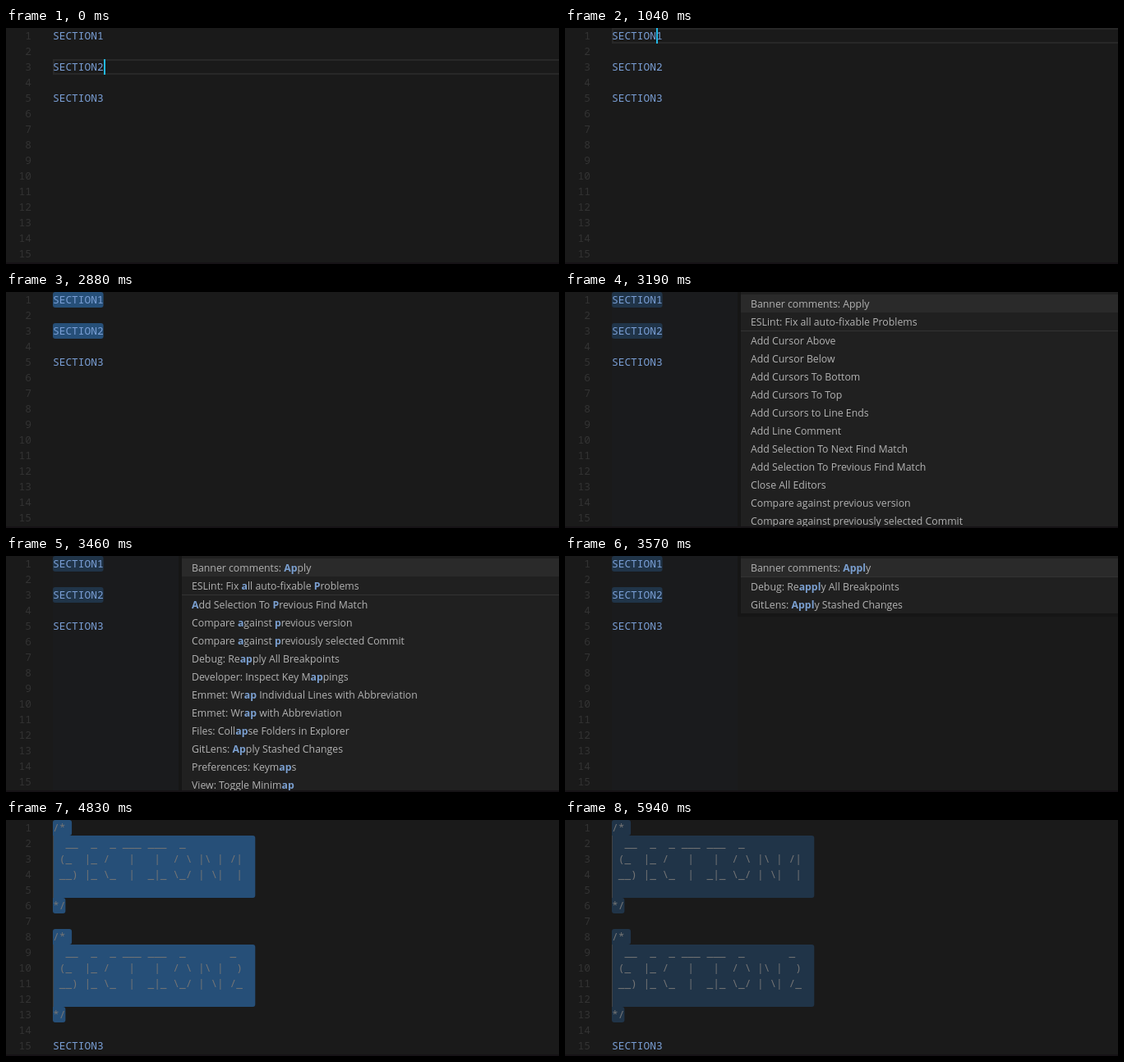
An HTML page for the animation above (5.97 s loop, 673 by 288 pixels).

```html
<!DOCTYPE html>
<html lang="en">
<head>
<meta charset="utf-8">
<title>Banner comments</title>
<style>
  html, body { margin: 0; width: 100%; height: 100%; overflow: hidden; background: #1a1a1a; }
  svg { display: block; }
  text { white-space: pre; }
  .code { font: 12.83px "Noto Sans Mono", monospace; fill: #7a9fd6; }
  .note { fill: #757575; }
  .num { fill: #333; text-anchor: end; }
  .menu { font: 12.3px "Open Sans", sans-serif; fill: #b2b2b2; }
  .menu tspan { font-weight: 700; fill: #7a9fd0; }
</style>
</head>
<body>
<svg id="stage" width="673" height="288" viewBox="0 0 673 288"></svg>
<script>
const LOOP = 5970, LINE = 19, LEFT = 57, CHAR = 7.697;
const stage = document.getElementById("stage");

const plain = ["SECTION1", "", "SECTION2", "", "SECTION3"];
const banner = (a, b, c) => [
  "/*",
  "  __  _  _ ___ ___  _       " + a,
  " (_  |_ /   |   |  / \\ |\\ | " + b,
  " __) |_ \\_  |  _|_ \\_/ | \\| " + c,
  "",
  "*/",
  ""
];
const banners = [...banner("", "/|", " |"), ...banner("_", " )", "/_"), "SECTION3"];

// Brackets mark the matched letters; "-" is the separator.
const listA = [
  "Banner comments: [A]pply", "ESLint: Fix [a]ll auto-fixable Problems", "-",
  "[A]dd Cursor Above", "[A]dd Cursor Below", "[A]dd Cursors To Bottom",
  "[A]dd Cursors To Top", "[A]dd Cursors to Line Ends", "[A]dd Line Comment",
  "[A]dd Selection To Next Find Match", "[A]dd Selection To Previous Find Match",
  "Close [A]ll Editors", "Compare [a]gainst previous version",
  "Compare [a]gainst previously selected Commit"
];
const listAll = listA.map(s => s.replace(/[\[\]]/g, ""));
const listAp = [
  "Banner comments: [Ap]ply", "ESLint: Fix [a]ll auto-fixable [P]roblems", "-",
  "[A]dd Selection To [P]revious Find Match", "Compare [a]gainst [p]revious version",
  "Compare [a]gainst [p]reviously selected Commit", "Debug: Re[ap]ply All Breakpoints",
  "Developer: Inspect Key M[ap]pings", "Emmet: Wr[ap] Individual Lines with Abbreviation",
  "Emmet: Wr[ap] with Abbreviation", "Files: Coll[ap]se Folders in Explorer",
  "GitLens: [Ap]ply Stashed Changes", "Preferences: Keym[ap]s", "View: Toggle Minim[ap]"
];
const listApp = [
  "Banner comments: [App]ly", "-", "Debug: Re[app]ly All Breakpoints",
  "Developer: Inspect Key M[app]ings", "GitLens: [App]ly Stashed Changes"
];
const listAppl = [
  "Banner comments: [Appl]y", "-", "Debug: Re[appl]y All Breakpoints",
  "GitLens: [Appl]y Stashed Changes"
];

// Selected blocks: [line, line count, columns]
const words = [[0, 1, 8], [2, 1, 8]];
const blocks = [[0, 1, 3], [1, 4, 32], [5, 1, 2], [7, 1, 3], [8, 4, 32], [12, 1, 2]];
const bannerCursors = [[0, 0], [7, 0]];

// Each step changes part of the state; the first cursor is the primary one.
const steps = [
  [0, { lines: plain, cursors: [[2, 8]], current: 2, sel: [], menu: null, blur: false, tint: -1 }],
  [120, { cursors: [] }],
  [360, { cursors: [[1, 0]], current: 1 }],
  [520, { cursors: [[0, 8]], current: 0 }],
  [980, { cursors: [] }],
  [1040, { cursors: [[0, 7]] }],
  [1250, { cursors: [[0, 7], [1, 0]] }],
  [1520, { cursors: [[0, 7], [1, 0], [2, 7]] }],
  [1860, { cursors: [[0, 7], [2, 7]] }],
  [2230, { cursors: [[0, 8], [2, 8]] }],
  [2410, { cursors: [[0, 0], [2, 0]], current: -1, sel: words }],
  [2880, { cursors: [] }],
  [3190, { menu: listAll, blur: true, tint: 0 }],
  [3400, { menu: listA }],
  [3460, { menu: listAp }],
  [3540, { menu: listApp }],
  [3570, { menu: listAppl }],
  [4250, { menu: null, blur: false, cursors: [[0, 0], [2, 0]], tint: 85 }],
  [4340, { lines: banners, sel: blocks, cursors: bannerCursors, tint: -1 }],
  [4830, { cursors: [] }],
  [5320, { cursors: bannerCursors }],
  [5820, { cursors: [] }],
  [5940, { blur: true }]
];

const rect = (x, y, w, h, fill, more = "") =>
  `<rect x="${x}" y="${y}" width="${w}" height="${h}" fill="${fill}" ${more}/>`;
const text = (x, y, cls, s) => `<text x="${x}" y="${y}" class="${cls}">${s}</text>`;

function drawSelection(s) {
  const fill = s.blur ? "#203448" : "#264f78";
  let out = s.sel.map(([line, n, cols]) =>
    rect(LEFT, line * LINE, cols * CHAR, n * LINE, fill, 'rx="3"')).join("");
  if (s.sel === blocks) {
    for (const top of [0, 7 * LINE]) {
      out += rect(LEFT, top + 4, 4, 6 * LINE - 8, fill);
      out += rect(LEFT, top + LINE, 1, 4 * LINE, "#404448");
    }
  }
  return out;
}

function drawMenu(items) {
  let y = 3, rows = "";
  for (const item of items) {
    if (item === "-") {
      rows += rect(214, y, 459, 1, "#333");
      y += 1;
    } else {
      const label = item.replace(/\[/g, "<tspan>").replace(/\]/g, "</tspan>");
      rows += text(226, y + 16, "menu", label);
      y += 22;
    }
  }
  return rect(210, 0, 463, y + 4, "#161616") + rect(214, 0, 459, y, "#202020") +
    rect(214, 3, 459, 22, "#2a2a2a") + rows;
}

function draw(s) {
  let out = rect(0, 0, 673, 288, "#1a1a1a");
  if (s.tint >= 0) out += rect(LEFT, s.tint, 153, 286 - s.tint, "#1a1b1d");
  if (s.current >= 0) {
    out += rect(LEFT + 1, s.current * LINE + 1, 640, LINE - 2, "none", 'stroke="#282828" stroke-width="2"');
  }
  out += drawSelection(s);
  for (let i = 0; i < 15; i++) out += text(31, i * LINE + 14, "code num", i + 1);
  s.lines.forEach((line, i) => {
    out += text(LEFT, i * LINE + 14, line.startsWith("SECTION") ? "code" : "code note", line);
  });
  s.cursors.forEach(([line, col], i) => {
    out += rect(Math.round(LEFT + col * CHAR), line * LINE, 2, LINE, "#22b8e6", i ? 'opacity=".6"' : "");
  });
  if (s.menu) out += drawMenu(s.menu);
  return out + rect(0, 286, 673, 2, "#161316");
}

const start = performance.now();
let shown = -1;

function frame() {
  const t = Math.max(0, performance.now() - start) % LOOP;
  const past = steps.filter(([at]) => at <= t);
  if (past.length !== shown) {
    shown = past.length;
    stage.innerHTML = draw(Object.assign({}, ...past.map(([, change]) => change)));
  }
  requestAnimationFrame(frame);
}
frame();
</script>
</body>
</html>
```
